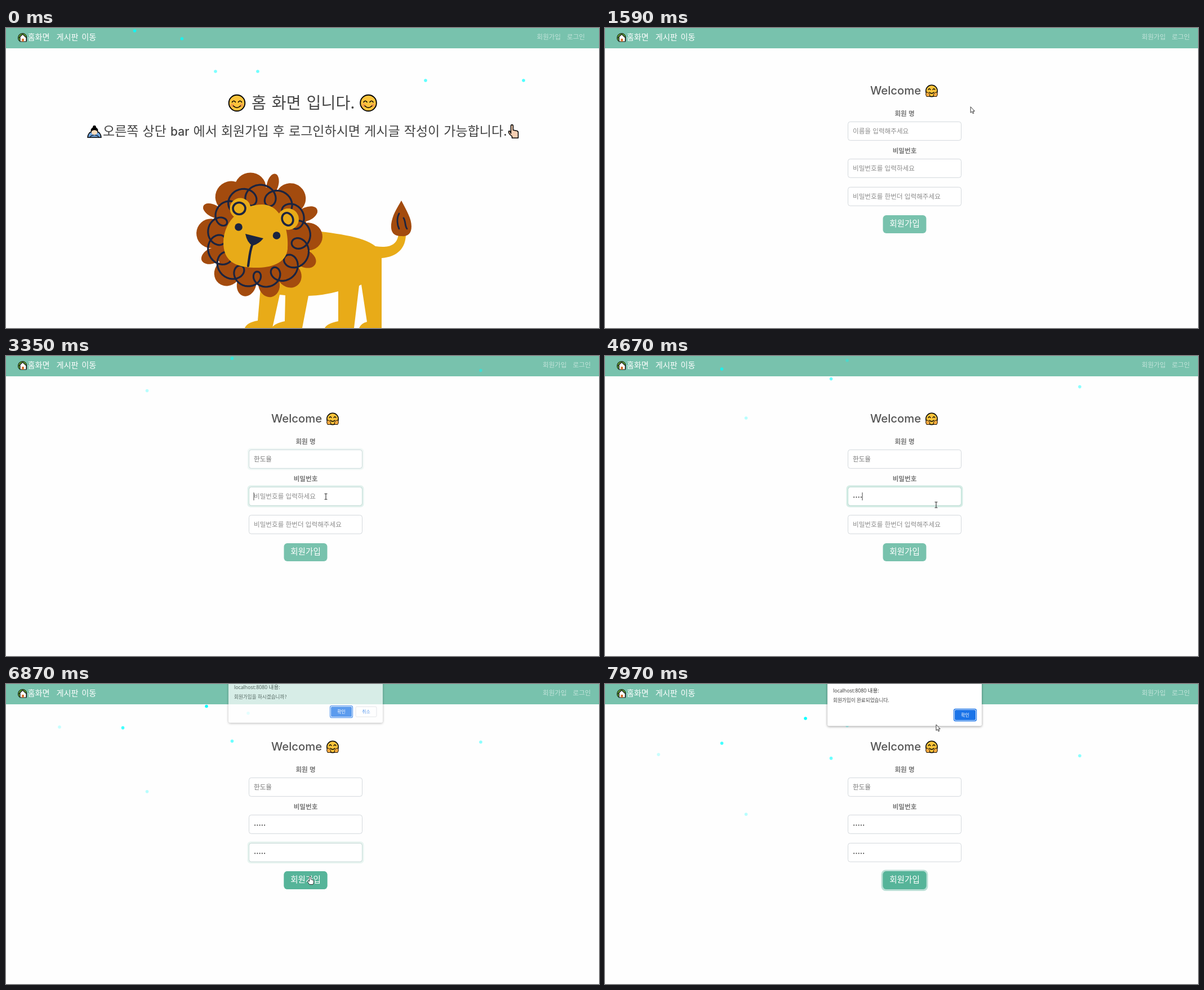
Animation of 1053 by 532 pixels, one loop 8000 ms. Source, as an HTML page:

```html
<!DOCTYPE html>
<html lang="ko">
<head>
<meta charset="utf-8">
<title>회원가입</title>
<style>
html, body { margin: 0; width: 100%; height: 100%; overflow: hidden; background: #fefefe; }
svg { display: block; width: 100%; height: 100%; }
text { font-family: "Noto Sans CJK KR", "Noto Sans CJK", sans-serif; font-size: 11.6px; white-space: pre; }
.latin { font-family: Inter, sans-serif; font-weight: 500; }
.small { font-family: "Open Sans", "Noto Sans CJK KR", sans-serif; }
.nav { font-size: 14.2px; word-spacing: 1.5px; fill: #fff; }
.title { font-size: 28.2px; font-weight: 300; word-spacing: 2px; fill: #444; }
.lead { font-size: 23px; font-weight: 300; word-spacing: .7px; fill: #444; }
.label { font-size: 11.6px; font-weight: 700; fill: #777; text-anchor: middle; }
.hint { fill: #8d8d8d; }
.dots { font-family: "DejaVu Sans", sans-serif; font-size: 7.2px; fill: #444; }
.pop { filter: drop-shadow(0 1px 2px rgba(0, 0, 0, .4)); }
.ink { fill: none; stroke: #1b2440; stroke-linecap: round; stroke-linejoin: round; }
.line { fill: none; stroke: #000; stroke-linecap: round; stroke-linejoin: round; }
.mid { text-anchor: middle; }
</style>
</head>
<body>
<svg viewBox="0 0 1053 532" preserveAspectRatio="none">
  <defs>
    <g id="smile">
      <circle r="14.3" fill="#fcc43c" stroke="#000" stroke-width="1.9"/>
      <circle cx="-8" cy="4" r="3" fill="#f3a04a"/><circle cx="8" cy="4" r="3" fill="#f3a04a"/>
      <path class="line" stroke-width="1.6" d="M-8.5-1.5q3-4.5 6 0M2.5-1.5q3-4.5 6 0M-6.5 5q6.5 6.500 13 0"/>
    </g>
    <g id="hug">
      <circle r="10.2" fill="#fcc43c" stroke="#000" stroke-width="1.5"/>
      <path class="line" stroke-width="1.3" d="M-6-2q2-3.5 4 0M2-2q2-3.5 4 0M-4 2.5q4 4 8 0"/>
      <path d="M-9.5 2q4 0 6 4 1 3-1 4h-4.5q-2.5-3-.5-8ZM9.5 2q-4 0-6 4-1 3 1 4h4.5q2.5-3 .5-8Z" fill="#f4aa41" stroke="#000" stroke-width=".9"/>
    </g>
  </defs>

  <rect width="1053" height="36" fill="#78c2ad"/>
  <g id="house">
    <path d="M21.5 18q0-8 8-8.5 5 0 7 5v8.5h-13q-2-2-2-5Z" fill="#5c9e31" stroke="#111"/>
    <path d="M23.5 17 29.5 11l6.5 6v7H25v-7Z" fill="#fff" stroke="#111" stroke-width="1.2"/>
    <path d="M28 24v-5h4v5Z" fill="#d9773a"/>
  </g>
  <text class="nav" x="38.5" y="21">홈화면</text>
  <text class="nav" x="89.5" y="21">게시판 이동</text>
  <text id="join" y="20" fill="#fff">회원가입</text>
  <text id="login" y="20" fill="#fff" fill-opacity=".55">로그인</text>

  <g id="home">
    <text class="title" x="436" y="143">홈 화면 입니다.</text>
    <text class="lead" x="172" y="191">오른쪽 상단 <tspan class="latin" font-size="21">bar</tspan> 에서 회원가입 후 로그인하시면 게시글 작성이 가능합니다.</text>
    <use href="#smile" x="410" y="133"/>
    <use href="#smile" x="643.5" y="133"/>
    <g id="bow">
      <path d="M145 194q1-9 7-10h10q6 1 7 10Z" fill="#6fa3dc" stroke="#000" stroke-width="1.5"/>
      <circle cx="157" cy="175.5" r="2.8"/>
      <circle cx="157" cy="182" r="6.5"/>
      <path d="M152 183q5-4 10 0v4q-5 5-10 0Z" fill="#fadcbc"/>
      <path class="line" stroke-width="1.1" d="M149 194q2-4 7-4M165 194q-2-4-7-4"/>
    </g>
    <path d="M896.5 187V174q0-2.5 2-2.5t2 2.5v7l7 1.5q2 .5 2 3v9.5h-11v-3q-6-4-6-8 0-2 2.5-1Z" fill="#f6cfb3" stroke="#000" stroke-width="1.5" stroke-linejoin="round"/>
    <g id="lion">
      <path fill="#e8ab18" d="M452 460 447 519Q428 522 424 532H473L486 473 496 474 495 520Q476 524 472 532H526L537 475Q565 474 590 467V520Q570 524 566 532H618L627 457 631 455 641 521Q630 524 627 532H667V408C695 406 710 390 710 366H697C694 388 676 390 656 387C634 369 580 363 530 358L460 380Z"/>
      <path fill="#a34b0e" d="M702 306C712 325 720 338 720 352C720 366 712 370 702 369C688 369 683 362 684 348C686 332 694 320 702 306Z"/>
      <path class="ink" stroke-width="2.8" d="M698 329C693 338 695 350 698 356M706 337C710 343 708 351 712 356"/>
      <g id="mane" fill="#a34b0e"><ellipse cx="450" cy="367" rx="86" ry="85"/></g>
      <path id="curls" class="ink" stroke-width="3.2"/>
      <g fill="#e8ab18">
        <circle cx="416" cy="320" r="18.5"/><circle cx="501" cy="339" r="19"/>
        <path d="M386 380C387 340 420 313 455 313C490 313 503 360 500 392C497 420 465 426 440 425C405 424 386 412 386 380Z"/>
      </g>
      <ellipse class="ink" cx="414" cy="320" rx="11" ry="10.5" stroke-width="3.6"/>
      <ellipse class="ink" cx="500" cy="339" rx="9.5" ry="11.5" transform="rotate(-25 500 339)" stroke-width="3.6"/>
      <g fill="#1b2440">
        <circle cx="413" cy="353" r="6.8"/><circle cx="480.5" cy="368" r="6.8"/>
        <path d="M425 365 457 373Q449 383 438 386 428 381 425 365Z"/>
      </g>
      <path class="ink" stroke-width="4.2" d="M437 385C433 395 432 408 430 422"/>
    </g>
  </g>

  <g id="signup">
    <text class="latin" x="471" y="118" fill="#555" style="font-size:20.3px">Welcome</text>
    <use href="#hug" x="580" y="111.5"/>
    <text class="label" x="532" y="156">회원 명</text>
    <text class="label" x="532" y="222">비밀번호</text>
    <g id="fields"></g>
    <rect id="btnRing" x="490.5" y="329.5" width="83" height="37.5" rx="8" fill="#78c2ad" fill-opacity=".5"/>
    <rect x="493.5" y="332" width="77" height="32" rx="6" fill="#78c2ad"/>
    <rect id="btnHot" x="493.5" y="332" width="77" height="32" rx="6" fill="#56b499"/>
    <text class="mid" x="532" y="352.3" fill="#fff" style="font-size:14.6px">회원가입</text>
    <g id="list">
      <path class="pop" d="M491.5 205.5H499L505 201 511 205.5H550.5V343H491.5Z" fill="#fff"/>
      <rect id="listHot" x="491.5" y="230.5" width="59" height="21.5" fill="#e7e7e9"/>
    </g>
  </g>

  <g id="rain" fill="#0ff"></g>
  <g id="ask" class="pop"></g>
  <g id="done" class="pop"></g>

  <g id="cursor">
    <path id="arrow" d="M0 0V10.5L2.4 8.3 4 12 5.7 11.3 4.2 7.7H7.2Z" fill="#fff" stroke="#222" stroke-width=".9"/>
    <path id="hand" d="M-1.3 8V.8Q-1.3-.7 0-.7T1.3.8V4.500L5 5.5Q6.300 6 6.3 7.5V10.5L5 13.5H-1.2L-4.3 8.8Q-4.6 7-3 7.2Z" fill="#fff" stroke="#222" stroke-width=".9"/>
    <path id="beam" d="M-2.5-5H2.500M0-5V5M-2.500 5H2.500" fill="none" stroke="#333" stroke-width="1.1"/>
  </g>
</svg>
<script>
const LOOP = 8000, SWAP = 1300, GLIDE = 450, KEY = 200;
const LIST_OPEN = 2200, LIST_HOT = 2400, LIST_SHUT = 2820;
const MEMBER = '한도율';
const $ = id => document.getElementById(id);
const clamp = v => Math.max(0, Math.min(1, v));
const ramp = (t, from, len = 150) => clamp((t - from) / len);
const show = (el, on) => el.setAttribute('display', on ? 'inline' : 'none');
const alpha = (el, a) => el.setAttribute('opacity', a.toFixed(3));

function add(parent, tag, attrs, text) {
  const el = document.createElementNS('http://www.w3.org/2000/svg', tag);
  for (const k in attrs) el.setAttribute(k, attrs[k]);
  if (text) el.textContent = text;
  return parent.appendChild(el);
}

// Mane: petals swing between wide and narrow around the head
const PETALS = 14;
for (let i = 0; i < PETALS; i++) {
  const swing = Math.cos(Math.PI * i * (PETALS - 1) / PETALS), rx = 23 + 4 * swing;
  add($('mane'), 'ellipse', {
    cx: 112 - rx, rx, ry: 19 + 9 * swing,
    transform: `translate(450 367) rotate(${i * 360 / PETALS - 101})`
  });
}

// Curls: a looping trochoid around the face
const curl = Array.from({ length: 400 }, (_, i) => {
  const a = i / 400 * Math.PI * 2, r = 16 + 2 * Math.sin(3 * a);
  const x = 449 + 76 * Math.cos(a) + r * Math.cos(14 * a + 1);
  const y = 371 + 75 * Math.sin(a) + r * Math.sin(14 * a + 1);
  return x.toFixed(1) + ' ' + y.toFixed(1);
});
$('curls').setAttribute('d', 'M' + curl.join('L') + 'Z');

const fields = [
  { y: 166, hint: '이름을 입력해주세요', focus: 2120, blur: 3250 },
  { y: 232, hint: '비밀번호를 입력하세요', focus: 3250, blur: 5050, typing: 4000 },
  { y: 282, hint: '비밀번호를 한번더 입력해주세요', focus: 5050, blur: 6800, typing: 5650 }
];
for (const f of fields) {
  const g = $('fields'), box = { x: 431.5, y: f.y + .3, width: 201, height: 33, rx: 4 };
  f.ring = add(g, 'rect', { x: 428.5, y: f.y - 2.7, width: 207, height: 39, rx: 6, fill: '#78c2ad', 'fill-opacity': .3 });
  f.box = add(g, 'rect', { ...box, fill: '#fff', stroke: '#d3d8dc' });
  f.edge = add(g, 'rect', { ...box, fill: 'none', stroke: '#bce1d6' });
  f.hintText = add(g, 'text', { x: 440, y: f.y + 21.2, class: 'hint' }, f.hint);
  f.value = add(g, 'text', { x: 440, y: f.y + 20.8, class: f.typing ? 'dots' : '' });
  f.caret = add(g, 'rect', { y: f.y + 10, width: 1, height: 14, fill: '#444' });
}

['관리자', MEMBER, '안녕', 'dyhahn42', 'demodemo', 'test'].forEach((name, i) =>
  add($('list'), 'text', { x: 499, y: 222 + i * 22.2, class: 'small', fill: '#222', style: `font-size:${i < 3 ? 8.7 : 8}px` }, name));

function dialog(g, message, buttons) {
  add(g, 'rect', { x: 395, y: -20, width: 274, height: 94.5, rx: 3, fill: '#fff' });
  const head = add(g, 'text', { x: 405, y: 15, class: 'small', fill: '#333', style: 'font-size:8.8px' }, 'localhost:8080 ');
  add(head, 'tspan', { 'font-size': 9.6 }, '내용:');
  add(g, 'text', { x: 405, y: 32, fill: '#444', style: 'font-size:8.6px' }, message);
  buttons.forEach((label, i) => {
    const x = 639.5 - 44 * (buttons.length - 1 - i);
    if (!i) add(g, 'rect', { x: x - 20, y: 44.5, width: 40, height: 21, rx: 3, fill: '#fff', stroke: '#1a73e8', 'stroke-width': 1.3 });
    add(g, 'rect', { x: x - 18.5, y: 46, width: 37, height: 18, rx: 2, fill: i ? '#fff' : '#1a73e8', stroke: i ? '#dadce0' : 'none' });
    add(g, 'text', { x, y: 57.8, class: 'mid', fill: i ? '#1a73e8' : '#fff', style: 'font-size:8px' }, label);
  });
}
dialog($('ask'), '회원가입을 하시겠습니까?', ['확인', '취소']);
dialog($('done'), '회원가입이 완료되었습니다.', ['확인']);

// Falling dots per page, brightest first: x, y at the page's reference time, px per s
const rain = [
  { at: 0, dim: .9, drops: [[584.5, -18, 23], [228.5, 5, 18.5], [312.5, 19, 23], [919, 93, 24], [745, 93, 38], [447, 77, 22.5], [372, 77, 20.5]] },
  { at: 6280, dim: .78, drops: [[356, 28, 19.5], [207.5, 63, 24.8], [401.5, 85, 27.6], [843, 90, 22], [430, 40, 20], [250.5, 169, 36.7], [95, 50, 44.4]] }
];
const drops = rain[0].drops.map(() => add($('rain'), 'circle', { r: 2.8 }));

// Pointer stops: arrival time, x, y
const stops = [[0, 1043, 504], [860, 966, 14], [1740, 540, 183], [2450, 565, 247], [3700, 588, 264],
  [5300, 606, 334], [6700, 540, 342], [7330, 597, 54], [7780, 588, 72]];

function pointer(t) {
  let [, x, y] = stops[0];
  for (const [arrive, tx, ty] of stops) {
    const p = ramp(t, arrive - GLIDE, GLIDE), e = p * p * (3 - 2 * p);
    x += (tx - x) * e;
    y += (ty - y) * e;
  }
  return [x, y];
}

function drawDialog(g, t, from, to) {
  const p = ramp(t, from, 100);
  show(g, t >= from && t < to);
  alpha(g, p);
  g.setAttribute('transform', `translate(0 ${(-20 * (1 - p)).toFixed(2)})`);
}

function drawMember(f, t) {
  const preview = t < LIST_SHUT;
  f.value.textContent = t >= LIST_HOT ? MEMBER : '';
  f.value.style.fontSize = (preview ? 9.8 : 11.6) + 'px';
  f.value.setAttribute('fill', preview ? '#222' : '#777');
  f.box.setAttribute('fill', preview && t >= LIST_HOT ? '#e8f0fe' : '#fff');
  return preview ? [440, f.focus] : [472.5, LIST_SHUT];
}

function drawSecret(f, t) {
  const n = Math.max(0, Math.min(5, 1 + Math.floor((t - f.typing) / KEY)));
  f.value.textContent = '•'.repeat(n);
  return [440 + n * 4.25, n ? f.typing + (n - 1) * KEY : f.focus];
}

function drawField(f, t) {
  const lit = ramp(t, f.focus) - ramp(t, f.blur);
  alpha(f.ring, lit);
  alpha(f.edge, lit);
  const [x, last] = f.typing ? drawSecret(f, t) : drawMember(f, t);
  show(f.hintText, !f.value.textContent);
  f.caret.setAttribute('x', x - .5);
  show(f.caret, t >= f.focus && t < f.blur && (t - last) % 1000 < 500);
}

function drawRain({ at, dim, drops: page }, t) {
  page.forEach(([x, y, speed], i) => {
    drops[i].setAttribute('cx', x);
    drops[i].setAttribute('cy', (y + speed * (t - at) / 1000).toFixed(2));
    alpha(drops[i], .95 * dim ** i);
  });
}

function drawCursor(t, x, y, onNav) {
  const onField = t >= SWAP && x > 431 && x < 633 && fields.some(f => y > f.y && y < f.y + 34);
  const onButton = t >= SWAP && x > 493 && x < 571 && y > 332 && y < 364;
  const kind = onField ? 'beam' : onNav || onButton ? 'hand' : 'arrow';
  ['arrow', 'hand', 'beam'].forEach(k => show($(k), k === kind));
  show($('cursor'), t > stops[1][0] - GLIDE);
  $('cursor').setAttribute('transform', `translate(${x.toFixed(1)} ${y.toFixed(1)})`);
}

function render(t) {
  const second = t >= SWAP, [x, y] = pointer(t);
  show($('home'), !second);
  show($('signup'), second);

  const joinX = second ? 953 : 942.5;
  const onNav = y < 30 && x > joinX && x < joinX + 43;
  $('join').setAttribute('x', joinX);
  $('join').setAttribute('fill-opacity', onNav ? 1 : .55);
  $('login').setAttribute('x', joinX + 53.5);

  fields.forEach(f => drawField(f, t));
  show($('list'), t >= LIST_OPEN && t < LIST_SHUT);
  show($('listHot'), t >= LIST_HOT);
  alpha($('btnHot'), ramp(t, 6620));
  alpha($('btnRing'), ramp(t, 7560));

  drawRain(rain[+second], t);
  drawDialog($('ask'), t, 6800, 7560);
  drawDialog($('done'), t, 7680, LOOP);
  drawCursor(t, x, y, onNav);
}

const start = performance.now();
function tick() {
  render((performance.now() - start) % LOOP);
  requestAnimationFrame(tick);
}
render(0);
requestAnimationFrame(tick);
</script>
</body>
</html>
```
